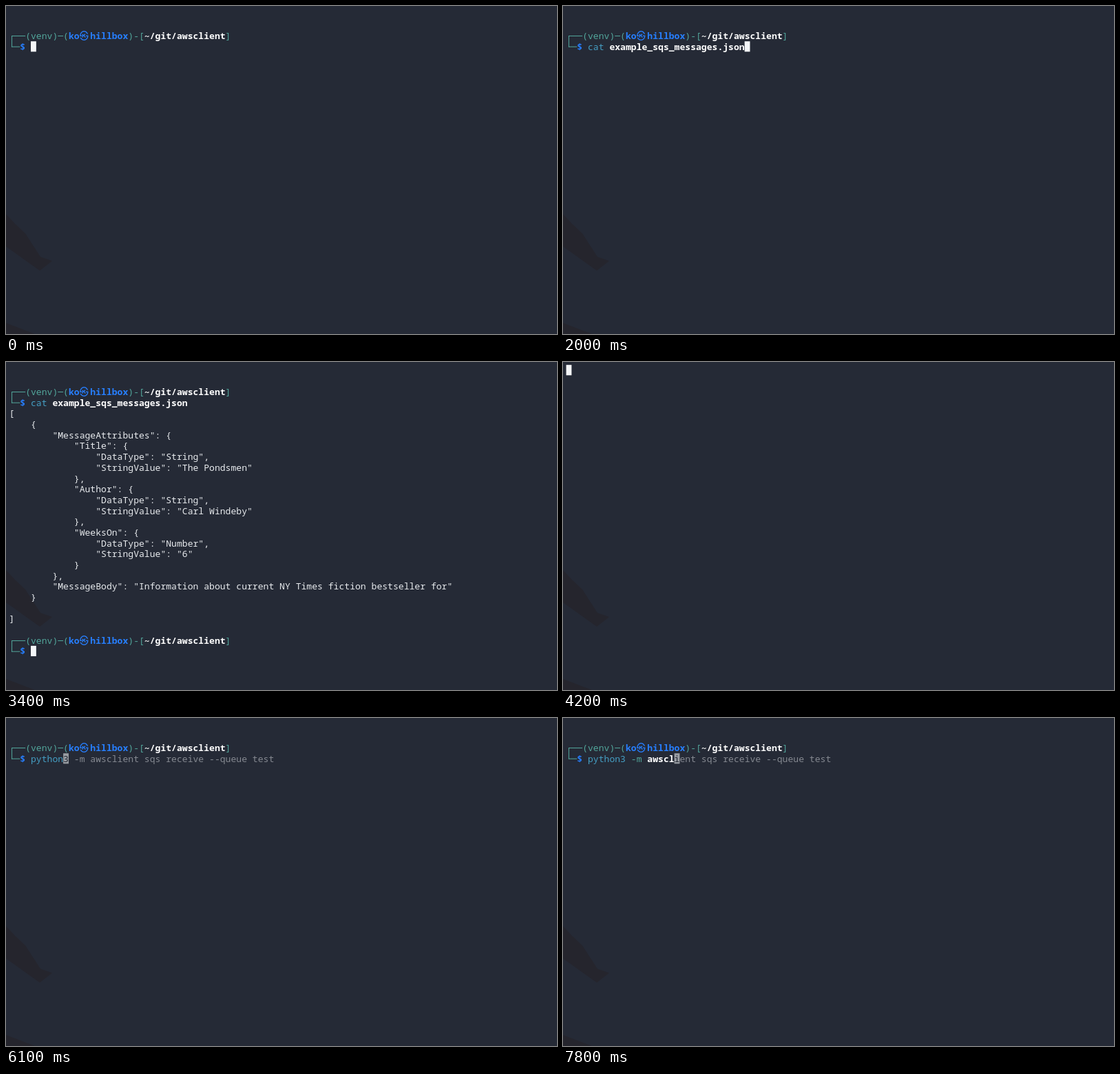
An HTML page with a canvas that plays this animation: 800x476 px, repeating every 8 s.

```html
<!DOCTYPE html>
<html lang="en">
<head>
<meta charset="utf-8">
<title>Terminal session</title>
<style>
  html, body { margin: 0; width: 100%; height: 100%; overflow: hidden; background: #252a36; }
  canvas { display: block; }
</style>
</head>
<body>
<canvas id="stage" width="800" height="476"></canvas>
<script>
const ctx = document.getElementById('stage').getContext('2d');
const LOOP = 8000, ENTER = 2400, CLEAR = 4200, RESTART = 4600;
const LEFT = 4.6, TOP = 4.2, CELL_W = 7.85, CELL_H = 15.68;
const BG = '#252a36', TEXT = '#e8ebee', WHITE = '#ffffff', TEAL = '#52a69b',
      BLUE = '#277fff', CYAN = '#459fc4', HINT = '#858991', SHADOW = '#25252d';

const attribute = (DataType, StringValue) => ({ DataType, StringValue });
const messages = [{
  MessageAttributes: {
    Title: attribute('String', 'The Pondsmen'),
    Author: attribute('String', 'Carl Windeby'),
    WeeksOn: attribute('Number', '6')
  },
  MessageBody: 'Information about current NY Times fiction bestseller for'
}];
const output = JSON.stringify(messages, null, 4).replace(/\n]$/, '\n\n]').split('\n');

// A burst types `chars` characters, one every `step` ms.
const burst = (start, chars, step) => t =>
  t < start ? 0 : Math.min(chars, 1 + Math.floor((t - start) / step));

const cat = {
  text: 'cat example_sqs_messages.json', program: 'cat',
  bursts: [burst(300, 3, 450), burst(1600, 26, 1)]
};
const python = {
  text: 'python3 -m awsclient sqs receive --queue test', program: 'python',
  bursts: [burst(5300, 9, 150), burst(6700, 5, 105), burst(7500, 2, 150)]
};

const colX = col => LEFT + col * CELL_W;
const rowY = row => TOP + row * CELL_H;

function print(str, col, row, color = TEXT, bold = false) {
  ctx.font = `${bold ? 'bold ' : ''}13.08px "Noto Sans Mono", "Noto Sans CJK KR", "Noto Sans CJK JP", monospace`;
  ctx.fillStyle = color;
  [...str].forEach((ch, i) => ctx.fillText(ch, colX(col + i), rowY(row) + 12.5));
}

function rect(x, y, w, h, color) {
  ctx.fillStyle = color;
  ctx.fillRect(x, y, w, h);
}

function background() {
  rect(0, 0, 800, 476, BG);
  ctx.fillStyle = SHADOW;
  ctx.fill(new Path2D('M0 302 L13 316 L28 330 L50 364 L67 370 L49 384 L0 349Z M0 460 L42 476 H0Z'));
}

function cursor(col, row, color = '#f4f6f8') {
  rect(colX(col), rowY(row), CELL_W, CELL_H - 0.6, color);
}

function prompt(row) {
  const x = colX(0.5) - 0.5, y = Math.round(rowY(row) + 7.5);
  const dash = (from, to, top) => rect(from, top, to - from, 1, TEAL);
  dash(x, colX(3), y);
  dash(x, colX(2), y + CELL_H);
  dash(colX(9), colX(10), y);
  rect(x, y, 1, CELL_H + 1, TEAL);
  print('(venv)', 3, row, TEAL);
  print('(', 10, row, TEAL);
  print('ko㉿', 11, row, BLUE, true);
  print('hillbox', 15, row, BLUE, true);
  print(')-[', 22, row, TEAL);
  print('~/git/awsclient', 25, row, WHITE, true);
  print(']', 40, row, TEAL);
  print('$', 2, row + 1, BLUE, true);
}

// Shell highlighting: known program, option, plain argument, or underlined unknown word.
function highlight(word, isFirst, program, col, row) {
  if (isFirst && !word.startsWith(program)) {
    print(word, col, row);
    rect(colX(col), rowY(row) + 14, word.length * CELL_W, 1, TEXT);
  } else if (isFirst) {
    print(word, col, row, CYAN);
  } else if (word[0] === '-') {
    print(word, col, row, TEAL);
  } else {
    print(word, col, row, WHITE, true);
  }
}

function command({ text, program, bursts }, t, row) {
  const count = bursts.reduce((sum, typed) => sum + typed(t), 0);
  for (const { 0: word, index } of text.slice(0, count).matchAll(/\S+/g))
    highlight(word, index === 0, program, 4 + index, row);

  const hint = count ? text.slice(count) : '';
  print(hint, 4 + count, row, HINT);
  if (t >= ENTER && t < CLEAR) return;
  cursor(4 + count, row, hint ? '#999da3' : undefined);
  print(hint.slice(0, 1), 4 + count, row, BG);
}

function draw(t) {
  background();
  if (t >= CLEAR && t < RESTART) return cursor(0, 0);
  prompt(2);
  command(t < CLEAR ? cat : python, t, 3);
  if (t >= ENTER && t < CLEAR) {
    output.forEach((line, i) => print(line, 0, 4 + i));
    prompt(25);
    cursor(4, 26);
  }
}

function tick() {
  draw(performance.now() % LOOP);
  requestAnimationFrame(tick);
}
tick();
</script>
</body>
</html>
```
